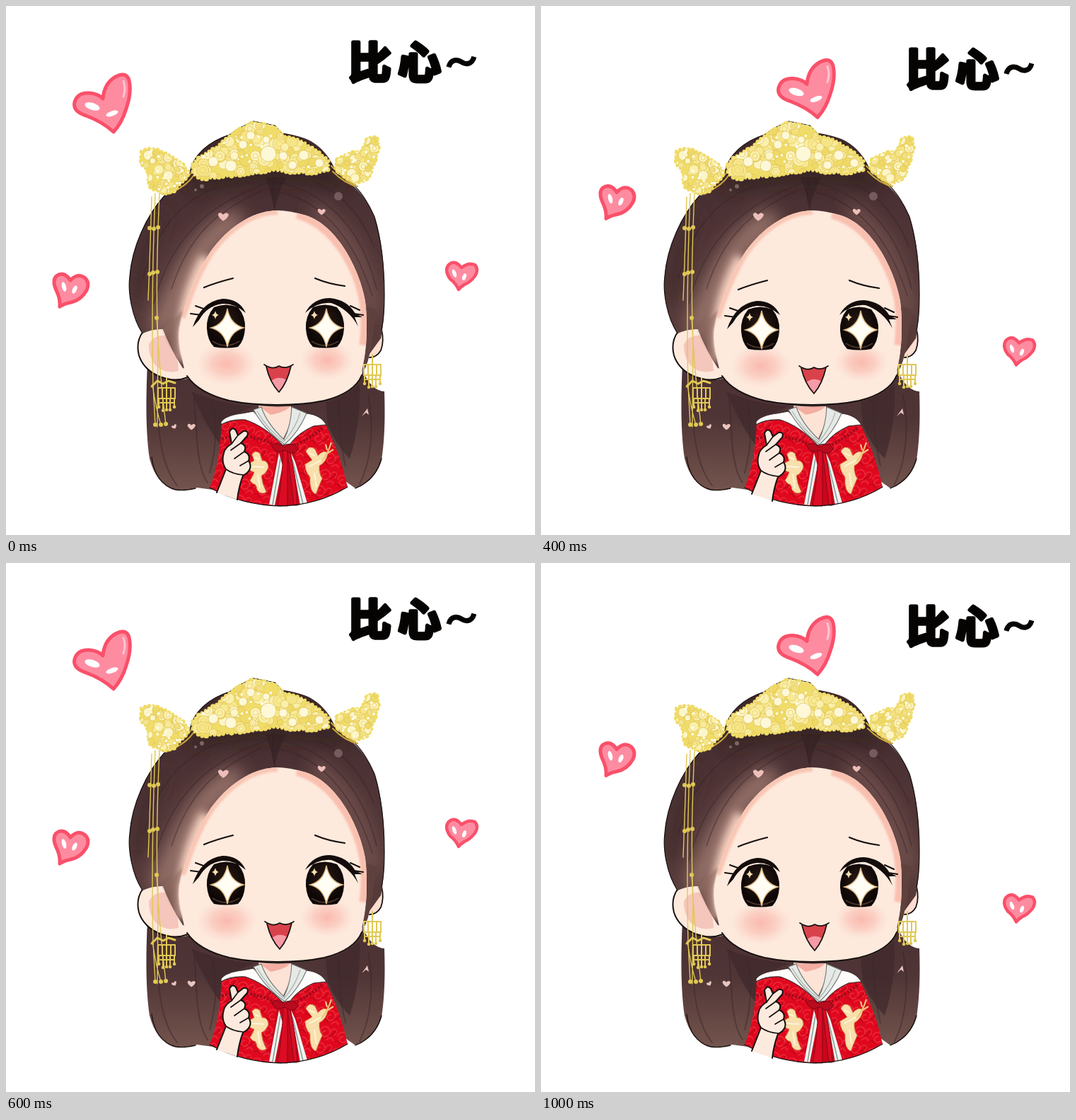
Animation of 748 by 748 pixels, one loop 1.2 s. Source, as an HTML page:

```html
<!DOCTYPE html>
<html lang="zh">
<head>
<meta charset="utf-8">
<title>比心</title>
<style>
html, body { margin: 0; width: 100%; height: 100%; overflow: hidden; background: #fff; }
svg { display: block; width: 100vw; height: 100vh; }
.hop { animation: hop 600ms step-end infinite; }
@keyframes hop {
  0%, 100% { translate: 0 0; }
  33.3333% { translate: var(--a); }
  66.6667% { translate: var(--b); }
}
#face { animation: face 1200ms step-end infinite; }
@keyframes face {
  0%, 50%, 100% { translate: 0 0; }
  16.6667% { translate: -4px 0; }
  33.3333%, 83.3333% { translate: -1px 3px; }
  66.6667% { translate: 2px 0; }
}
#mouth { transform-origin: 386px 508px; animation: mouth 1200ms step-end infinite; }
@keyframes mouth {
  0%, 100% { transform: none; }
  16.6667% { transform: translate(-1px, 0) scale(.96, .91); }
  33.3333% { transform: translate(0, 2px); }
  50% { transform: translate(1px, 0); }
  66.6667% { transform: translate(4px, 0) scale(.96, .91); }
  83.3333% { transform: translate(1px, 2px); }
}
#hand { transform-origin: 317px 690px; animation: hand 600ms step-end infinite; }
@keyframes hand {
  0%, 100% { transform: none; }
  33.3333% { transform: rotate(-11deg); }
  66.6667% { transform: translate(0, 2px); }
}
.word { font-family: "Noto Sans CJK SC", "Noto Sans CJK", "Noto Sans CJK JP", sans-serif; font-weight: 900;
  fill: #060403; stroke: #060403; stroke-linejoin: round; stroke-linecap: round; }
.heart { fill: #fe8ca1; stroke: #fa506a; stroke-width: 5; stroke-linejoin: round; }
.line { fill: none; stroke: #17100f; stroke-linecap: round; stroke-linejoin: round; }
.gold { fill: none; stroke: #e0c854; stroke-linecap: round; }
</style>
</head>
<body>
<svg viewBox="0 0 748 748">
<defs>
  <linearGradient id="hairFill" x1="0" y1="0" x2="0" y2="1">
    <stop offset="0" stop-color="#3d272a"/><stop offset=".4" stop-color="#503537"/><stop offset="1" stop-color="#593d3b"/>
  </linearGradient>
  <linearGradient id="backFill" x1="0" y1="0" x2="0" y2="1">
    <stop offset="0" stop-color="#492f31"/><stop offset=".5" stop-color="#4f3536"/><stop offset="1" stop-color="#74544d"/>
  </linearGradient>
  <radialGradient id="blush">
    <stop offset="0" stop-color="#f9aca2" stop-opacity=".8"/><stop offset=".5" stop-color="#fab9ae" stop-opacity=".55"/><stop offset="1" stop-color="#fdd0c4" stop-opacity="0"/>
  </radialGradient>
  <radialGradient id="iris" cy=".4">
    <stop offset="0" stop-color="#2b1a15"/><stop offset="1" stop-color="#0d0706"/>
  </radialGradient>
  <filter id="soft" x="-50%" y="-50%" width="200%" height="200%"><feGaussianBlur stdDeviation="12"/></filter>
  <filter id="fine" x="-30%" y="-30%" width="160%" height="160%"><feGaussianBlur stdDeviation="1.6"/></filter>
  <filter id="fade" x="-80%" y="-30%" width="260%" height="160%"><feGaussianBlur stdDeviation="6"/></filter>
  <pattern id="swirl" width="26" height="24" patternUnits="userSpaceOnUse" patternTransform="rotate(18)">
    <rect width="26" height="24" fill="#e0081e"/>
    <path d="M3 12a7 7 0 1 1 10 5a4 4 0 1 1-2-7M15 22q5-9 10-2M18 8a4 4 0 1 1 5 3" fill="none" stroke="#f23644" stroke-width="1.2"/>
    <path d="M1 20q6-4 9 2M16 14q6 0 8-10" fill="none" stroke="#b70318" stroke-width="1.3"/>
  </pattern>
  <path id="hairShape" d="M193 463C178 440 172 405 175 382C178 342 198 296 226 266L260 236C264 210 288 191 316 182C345 173 392 176 422 187C446 196 460 216 468 238C492 250 514 276 523 304C532 335 535 370 535 408C535 435 533 455 530 470L514 492Q511 510 502 522L380 540L250 512Q234 488 222 457Q208 456 193 463Z"/>
  <path id="faceShape" d="M384 289C345 290 312 316 290 346C269 378 258 410 248 440C243 458 243 474 247 492L254 521Q272 547 316 558C355 566 412 566 450 558Q493 547 503 522C510 490 512 450 508 418C500 372 468 310 424 296Q400 289 384 289Z"/>
  <path id="capeShape" d="M305 588Q330 578 352 582L392 612L420 586Q440 582 453 594Q473 635 483 680Q440 706 388 707Q334 706 288 681Q303 645 305 588Z"/>
  <path id="crownShape" d="M264 224L276 212L299 200L313 187L331 174L350 165L379 171L391 184L420 192L441 207L456 219L455 232L438 236L402 235L380 232L330 239L300 242L277 245L265 238Z"/>
  <path id="leftShape" d="M191 205L206 201L226 209L248 222L259 236L249 249L239 261L225 265L207 259L200 249L203 237L192 224Z"/>
  <path id="rightShape" d="M469 217L483 209L505 204L512 187L523 185L527 200L522 216L515 238L508 247L495 251L482 243L466 232Z"/>
  <clipPath id="hairClip"><use href="#hairShape"/></clipPath>
  <clipPath id="faceClip"><use href="#faceShape"/></clipPath>
  <clipPath id="crownClip"><use href="#crownShape"/></clipPath>
  <clipPath id="leftClip"><use href="#leftShape"/></clipPath>
  <clipPath id="rightClip"><use href="#rightShape"/></clipPath>
  <path id="spark" d="M0-27Q4-5 23 0Q4 5 0 27Q-4 5-23 0Q-4-5 0-27Z"/>
  <path id="tiny" d="M0 6Q-8 0-7-4Q-4-8 0-3Q5-8 8-3Q7 2 0 6Z"/>
  <g id="eye">
    <path d="M-17-27Q0-34 17-27Q28-14 27 3Q26 20 17 29Q0 32-17 29Q-26 20-27 3Q-28-14-17-27Z" fill="url(#iris)"/>
    <path d="M-19 21Q0 33 19 21" fill="none" stroke="#49332a" stroke-width="2"/>
    <use href="#spark" x="2" y="2" fill="#fffdf4" stroke="#dfbc85" stroke-width="1.4"/>
    <use href="#spark" transform="translate(-15 -16) scale(.22)" fill="#f7dfb0"/>
  </g>
  <g id="earring" class="gold" stroke-width="2">
    <path d="M0-12V32M-12 2H12M-12 2V17H12V2M-6 2V17M6 2V17M-11 17V29M-5 17V34M5 17V33M11 17V29M-9 23H10"/>
    <path d="M-11 29h.1M-5 34h.1M0 33h.1M5 33h.1M11 29h.1" stroke-width="4.5"/>
  </g>
</defs>

<!-- lower hair -->
<path d="M200 505C198 550 197 600 203 640Q212 674 236 684Q256 686 270 681L300 685L390 640L480 672L494 682Q522 672 531 642C536 610 536 575 535 545Q515 544 503 512L480 480H230Z" fill="url(#backFill)"/>
<g fill="none" stroke="#38242a" stroke-linecap="round" stroke-width="2" opacity=".45">
  <path d="M216 540C212 600 220 650 242 678M266 552C270 600 268 650 285 674M292 562Q302 610 288 660M512 550C520 590 518 640 500 676M470 558Q470 610 480 650"/>
</g>
<path d="M262 545Q300 562 350 566L320 580Q300 585 307 625Q285 600 262 545ZM452 560Q480 552 500 535Q502 590 486 640Q466 620 455 592Z" fill="#3f292b" opacity=".7"/>
<path class="line" d="M206 638Q211 676 240 684Q252 686 268 682M494 682Q523 670 531 640" stroke-width="1.3"/>
<g fill="#eac5bd"><use href="#tiny" transform="translate(262 595) scale(.75)"/><use href="#tiny" transform="translate(238 595) rotate(-30) scale(.5)"/><path d="M503 580L511 569L513 578L509 575Z"/></g>

<!-- ears -->
<path d="M194 460Q183 475 188 494Q194 513 215 523Q238 533 260 526L252 450Z" fill="#fdeadd"/>
<path d="M202 478Q210 464 226 466Q243 486 244 516Q224 521 211 508Q201 495 202 478Z" fill="#f4bdb3" opacity=".8"/>
<path class="line" d="M194 460Q183 475 188 494Q194 513 215 523Q238 533 257 525" stroke-width="2"/>
<path d="M510 465L531 457Q535 474 530 487Q524 497 511 498Z" fill="#fdddd0"/>
<path class="line" d="M531 457Q535 474 530 487Q524 497 514 497" stroke-width="1.8"/>

<!-- head -->
<use href="#hairShape" fill="url(#hairFill)"/>
<g clip-path="url(#hairClip)">
  <g filter="url(#soft)" fill="none" stroke-linecap="round">
    <path d="M320 305C265 340 245 400 222 450" stroke="#98736a" stroke-width="32"/>
    <path d="M440 290Q500 335 518 430" stroke="#7d5a54" stroke-width="18"/>
    <path d="M218 300Q190 340 186 410" stroke="#402a2c" stroke-width="18"/>
    <path d="M270 250Q370 222 470 246" stroke="#33211f" stroke-width="18"/>
  </g>
  <g fill="none" stroke="#342123" stroke-width="1.8" stroke-linecap="round" opacity=".4">
    <path d="M379 240Q374 265 380 289M370 250C320 270 240 300 209 420M360 262C300 290 260 320 234 400M300 255C250 275 215 310 194 385M388 250C440 262 500 300 524 400M390 264C440 275 490 320 518 410M440 250Q495 276 520 340"/>
  </g>
  <path d="M367 242Q376 268 380 288Q385 262 397 242Z" fill="#2e1e21" opacity=".5"/>
  <path d="M284 356Q258 404 252 446Q246 470 252 500" fill="none" stroke="#f6d0bf" stroke-width="20" filter="url(#fade)"/>
</g>
<path class="line" d="M193 463C178 440 172 405 175 382C178 342 198 296 226 266M260 236C264 210 288 191 316 182L331 172L350 163L380 169L391 181Q448 194 468 238Q500 250 521 298C532 335 535 370 535 408Q535 440 531 458" stroke-width="1.2"/>
<use href="#faceShape" fill="#fdeadd"/>
<g clip-path="url(#faceClip)" fill="none" filter="url(#fine)">
  <path d="M384 289C345 290 312 316 290 346C269 378 258 410 248 440" stroke="#f9c6b4" stroke-width="12"/>
  <path d="M412 292C468 308 500 372 508 418Q512 445 508 480" stroke="#f9c0b0" stroke-width="17"/>
</g>
<path d="M222 457Q234 488 249 503Q241 480 243 458L250 430Z" fill="#8f6a60" opacity=".6" filter="url(#fine)"/>
<path class="line" d="M256 523Q272 547 316 558C355 566 412 566 450 558Q493 547 503 522" stroke-width="2"/>
<path d="M511 425Q514 470 503 517Q514 500 517 478L524 430Z" fill="#5e413d"/>
<g fill="#eebfba"><use href="#tiny" transform="translate(307 298)"/><use href="#tiny" transform="translate(446 291) scale(.75)"/></g>
<circle cx="470" cy="269" r="6" fill="#755b5d"/><circle cx="277" cy="255" r="3" fill="#806466"/><circle cx="268" cy="260" r="2" fill="#806466"/>

<!-- headdress -->
<g class="gold" stroke-width="1.4">
  <path d="M206 270Q204 340 201 416M211 265Q205 410 208 536L211 592M217 264Q211 400 215 470L214 595M207 535Q212 570 219 592M213 440Q217 520 226 592"/>
  <path d="M203 314h.1M209 315h.1M215 313h.1M203 379h.1M208 377h.1M214 376h.1M213 441h.1M211 592h.1M219 592h.1M226 591h.1" stroke-width="6"/>
  <path d="M222 266Q246 256 262 236M230 266Q256 254 265 240M462 234Q480 252 497 255M460 226Q478 246 494 253" stroke="#cba73b" stroke-width="2"/>
  <path d="M206 538L214 530L222 534L230 530L239 533" stroke-width="3"/>
</g>
<use href="#earring" x="227" y="538"/>
<use href="#earring" x="518" y="505"/>
<g id="jewels"></g>

<!-- clothes -->
<path d="M357 565Q382 568 403 566L405 584L392 612L362 585Z" fill="#fde3d6"/>
<path d="M358 566Q382 568 402 566Q396 574 374 578Z" fill="#f3aea1"/>
<use href="#capeShape" fill="url(#swirl)"/>
<path d="M305 612Q345 602 382 622M402 624Q430 612 448 596" fill="none" stroke="#9c0b1c" stroke-width="4" stroke-dasharray="3 2"/>
<path d="M383 626L372 704L412 706L426 703L406 624Z" fill="#c9071b"/>
<path d="M386 632L372 705L380 706L391 650ZM403 632L416 706L426 703L409 645Z" fill="#f4f3ef"/>
<path d="M388 640L377 705M405 642L420 704" stroke="#87a29f" stroke-width="1.6"/>
<path d="M392 628Q391 670 384 706L398 707L398 630L407 706L412 706Q410 665 401 628Z" fill="#db0c24" stroke="#8a0919" stroke-width="1"/>
<path d="M304 588Q310 579 334 576L350 573L392 618L425 576Q445 578 453 592L435 594Q414 603 402 619L391 621Q366 594 338 585Q318 584 304 592Z" fill="#fffdfc" stroke="#3b2a2a" stroke-width="1.2"/>
<path d="M350 571L361 567Q369 591 393 613Q403 593 404 567L425 576Q414 602 394 620Q366 600 350 571Z" fill="#e6e9e5" stroke="#6f7774" stroke-width="1.1"/>
<path d="M355 573Q370 599 393 616Q410 596 416 575" fill="none" stroke="#a9b5af" stroke-width="1.2"/>
<path d="M394 624Q380 614 376 622Q380 634 394 628Q408 638 413 626Q408 614 394 624Z" fill="#b90a1e" stroke="#780816" stroke-width="1"/>
<g fill="#f8dfac" stroke="#d59a4c" stroke-width=".8">
  <path d="M348 634Q353 627 359 633L362 643Q370 642 371 652Q368 661 361 664Q362 676 368 687Q361 692 355 684Q354 675 350 676L345 671Q350 664 351 659Q342 657 342 650Q345 645 351 643Z"/>
  <path d="M424 630Q429 620 437 627L441 636Q449 627 455 632Q453 645 443 650Q442 661 447 668Q443 677 438 690Q429 687 430 666Q423 658 423 648Q428 645 433 642Z"/>
  <path d="M446 644Q455 634 460 617M452 634L463 627M454 628L452 620" fill="none" stroke="#f0c67c" stroke-width="2.2"/>
  <path d="M351 638l7 3M347 651l18 1M356 662l3 20M428 632l9 4M429 651l17-9M436 660l3 20" fill="none" stroke="#fff6df" stroke-width="1.8"/>
</g>
<path class="line" d="M288 681Q334 706 388 707Q440 706 483 680" stroke-width="1.3"/>

<g id="hand">
  <path class="line" style="fill:#fdeadf" stroke-width="2" d="M298 688Q306 668 311 655Q304 645 308 632Q310 624 319 619L316 602Q320 594 325 600L328 607L336 601Q344 600 341 608L332 618Q341 621 337 630Q346 634 343 643Q349 652 341 660Q337 663 335 664Q329 680 327 698"/>
  <path class="line" stroke-width="1.7" d="M328 607L319 619M332 618L318 628M337 630L323 640M343 643L331 650M311 655Q321 662 335 663"/>
</g>

<g id="face">
  <ellipse cx="312" cy="506" rx="43" ry="31" fill="url(#blush)"/>
  <ellipse cx="454" cy="501" rx="38" ry="28" fill="url(#blush)"/>
  <path class="line" d="M280 398Q297 391 321 385M437 385Q456 393 479 396" stroke-width="2.2"/>
  <use href="#eye" x="311" y="453"/>
  <use href="#eye" x="451" y="453"/>
  <path d="M264 454Q276 418 306 414Q330 414 339 434Q323 420 306 421Q284 424 273 444Z" fill="#130c0b"/>
  <path d="M423 434Q434 413 458 413Q482 415 494 435L504 440L493 440L498 453Q484 428 460 420Q440 418 423 434Z" fill="#130c0b"/>
  <path class="line" d="M261 435L276 437M268 424L282 429M492 435L505 437M487 424L500 430" stroke-width="2"/>
</g>
<g id="mouth">
  <path d="M368 510Q379 514 386 509Q394 513 403 509Q398 532 386 546Q373 532 368 510Z" fill="#d9424b"/>
  <path d="M375 530Q386 522 397 529Q393 539 386 546Q379 540 375 530Z" fill="#f69aa6"/>
  <path class="line" d="M365 507Q377 515 386 509Q395 514 406 507M368 510Q373 532 386 546Q398 532 403 509" stroke-width="1.7"/>
</g>

<!-- floating hearts and words -->
<g class="hop" style="--a:65px -12.5px;--b:239px -20.5px">
  <path class="heart" d="M152 178Q137 164 113 155Q94 149 97 136Q101 122 118 123Q130 124 137 131Q139 109 155 100Q170 92 174 105Q178 122 170 145Q164 165 152 178Z"/>
  <g fill="#fff"><ellipse cx="122" cy="142" rx="11" ry="5" transform="rotate(18 122 142)"/><ellipse cx="150" cy="152" rx="9" ry="3.5" transform="rotate(-20 150 152)"/></g>
  <path d="M166 106Q170 116 166 128" fill="none" stroke="#ffc4ce" stroke-width="3" stroke-linecap="round"/>
</g>
<g class="hop" style="--a:12px -60.5px;--b:16px -124.5px">
  <path class="heart" d="M76 425Q77 414 71 402Q65 388 71 382Q82 374 91 388Q101 377 111 384Q119 391 114 402Q106 416 92 419Q82 421 76 425Z"/>
  <g fill="#fff"><ellipse cx="82" cy="397" rx="3" ry="7" transform="rotate(-14 82 397)"/><ellipse cx="97" cy="401" rx="3" ry="6" transform="rotate(25 97 401)"/></g>
</g>
<g class="hop" style="--a:5px -279.5px;--b:32px 106.5px">
  <path class="heart" d="M640 401Q636 392 628 386Q620 375 625 367Q634 357 644 370Q654 362 663 366Q669 373 663 382Q656 391 648 394Q643 397 640 401Z" style="stroke-width:4.4"/>
  <g fill="#fff"><ellipse cx="634" cy="378" rx="2.6" ry="6" transform="rotate(-20 634 378)"/><ellipse cx="648" cy="383" rx="2.6" ry="5" transform="rotate(20 648 383)"/></g>
</g>
<g class="hop" style="--a:-55px 16.5px;--b:32px 9.5px">
  <text class="word" font-size="60" stroke-width="5.500" y="102"><tspan x="484.500">比</tspan><tspan x="554.500">心</tspan><tspan x="625" y="101" rotate="-12" font-size="46" stroke-width="1.5">～</tspan></text>
</g>
</svg>
<script>
const NS = 'http://www.w3.org/2000/svg';
const jewels = document.getElementById('jewels');
let seed = 11;
const rand = () => (seed = seed * 16807 % 2147483647) / 2147483647;
const tones = ['#faf0ac', '#f6e588', '#fcf5c6', '#efda66', '#f8e994'];

function add(parent, tag, attrs) {
  const el = document.createElementNS(NS, tag);
  for (const k in attrs) el.setAttribute(k, attrs[k]);
  return parent.appendChild(el);
}

function bead(parent, cx, cy, r, fill) {
  add(parent, 'circle', { cx, cy, r, fill, stroke: '#dfc258', 'stroke-width': .7 });
}

// Beads along the rim, then a random cluster inside.
function ornament(name, count, size, specks) {
  const shape = document.getElementById(name + 'Shape');
  const box = shape.getBBox();
  const len = shape.getTotalLength();
  for (let d = 0; d < len; d += 6) {
    const p = shape.getPointAtLength(d);
    add(jewels, 'circle', { cx: p.x, cy: p.y, r: 2 + rand() * 2, fill: '#f0dc68' });
  }
  add(jewels, 'use', { href: '#' + name + 'Shape', fill: '#f0dc68' });
  const g = add(jewels, 'g', { 'clip-path': `url(#${name}Clip)` });
  const spot = () => [box.x + rand() * box.width, box.y + rand() * box.height];
  for (let i = 0; i < count; i++) {
    const [x, y] = spot();
    const r = size * (.45 + rand() * .55);
    bead(g, x, y, r, tones[i % tones.length]);
    if (i % 2) add(g, 'circle', { cx: x, cy: y, r: r * .5, fill: 'none', stroke: '#ecd36a' });
  }
  for (let i = 0; i < specks; i++) {
    const [cx, cy] = spot();
    add(g, 'circle', { cx, cy, r: 1.8, fill: '#fffdf0' });
  }
}

ornament('left', 55, 7, 28);
ornament('right', 55, 7, 28);
ornament('crown', 150, 9, 14);
for (const [x, y, r] of [[371, 209, 11], [346, 183, 6], [368, 189, 5], [421, 211, 7], [335, 196, 6],
  [392, 212, 6], [318, 226, 8], [293, 220, 7], [405, 225, 6], [443, 222, 6]])
  bead(jewels, x, y, r, '#fdf8d8');
</script>
</body>
</html>
```
